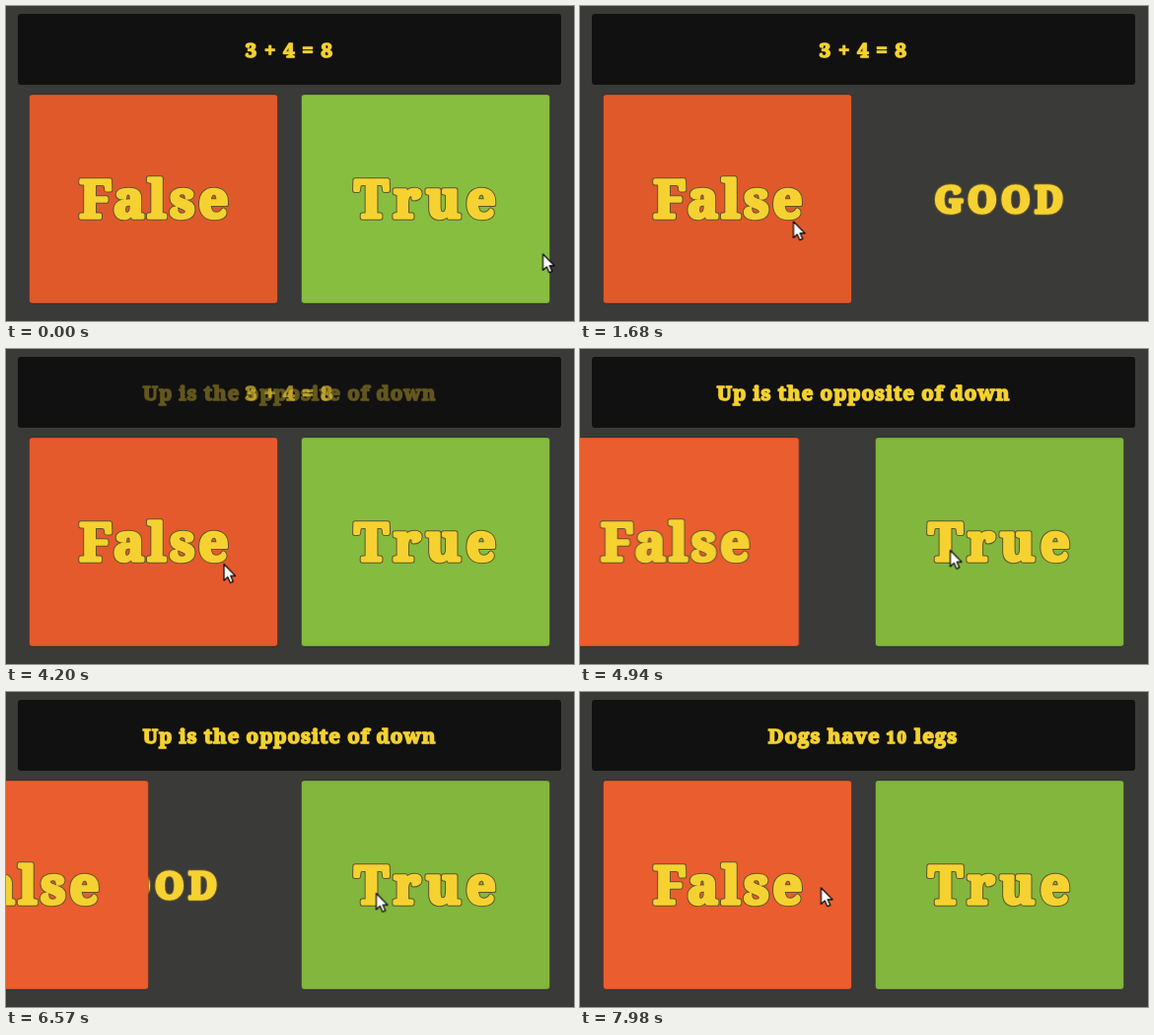
Recreate the animation shown at these times as an HTML page. Size 576 by 320 pixels, loop 8000 ms.

```html
<!DOCTYPE html>
<html lang="en">
<head>
<meta charset="utf-8">
<title>True or False</title>
<style>
html, body { margin: 0; width: 100%; height: 100%; overflow: hidden; background: #3a3a39; }
svg { display: block; width: 100%; height: 100%; }
text { font-family: "Noto Serif", serif; font-weight: 700; text-anchor: middle; }
.answer { font-size: 53px; letter-spacing: 3.4px; }
.wide { letter-spacing: 5.2px; }
.praise { font-size: 37.5px; letter-spacing: 4.6px; }
.question { font-size: 20.5px; letter-spacing: .95px; }
.sum { letter-spacing: 1.2px; }
.low { font-size: 16px; letter-spacing: 2px; }

/* Each label is a dark rim under a thickened yellow face. */
.rim, .face { stroke-linejoin: round; }
.rim { fill: #63552c; stroke: #63552c; stroke-width: 5.4px; }
.face { fill: #f5d231; stroke: #f5d231; stroke-width: 3.4px; }
.small .rim { stroke: #4d431b; stroke-width: 2.4px; }
.small .face { stroke-width: 1.4px; }
.card { stroke: #000; stroke-opacity: .25; }

.loop, .loop * { animation: 8s linear infinite; }
#true-card { animation-name: slide-right; }
#false-card { animation-name: slide-left; }
#orange { fill: #e0592b; animation-name: orange; }
#green { fill: #87be40; animation-name: green; }
#q1 { animation-name: first; }
#q2 { opacity: 0; animation-name: second; }
#q3 { opacity: 0; animation-name: third; }
#cursor { animation-name: point; animation-timing-function: ease-in-out; }

@keyframes slide-right {
  0%, 14.59% { transform: none; }
  20.09%, 33.625% { transform: translateX(277px); }
  39.125%, 100% { transform: none; }
}
@keyframes slide-left {
  0%, 60.7% { transform: none; }
  66.2%, 79.25% { transform: translateX(-276px); }
  84.75%, 100% { transform: none; }
}
@keyframes orange {
  0%, 50.25% { fill: #e0592b; }
  56.5%, 100% { fill: #ea5d2f; }
}
@keyframes green {
  0%, 50.25% { fill: #87be40; }
  56.5%, 100% { fill: #82b63c; }
}
@keyframes first {
  0%, 50.25% { opacity: 1; }
  56.5%, 100% { opacity: 0; }
}
@keyframes second {
  0%, 50.25% { opacity: 0; }
  56.5%, 93.25% { opacity: 1; }
  99.6%, 100% { opacity: 0; }
}
@keyframes third {
  0%, 93.25% { opacity: 0; }
  99.6%, 100% { opacity: 1; }
}
@keyframes point {
  0%, .375% { transform: translate(544.5px, 252px); }
  6.625%, 51.5% { transform: translate(216.5px, 219px); }
  59.875%, 93.25% { transform: translate(375.5px, 204.5px); }
  99.75%, 100% { transform: translate(244.5px, 199px); }
}
</style>
</head>
<body>
<svg viewBox="0 0 576 320" preserveAspectRatio="none">
  <defs>
    <text id="false-text" class="answer" x="151.7" y="215">False</text>
    <text id="true-text" class="answer wide" x="427.5" y="215">True</text>
    <text id="good-text" class="praise" x="427" y="210">GOOD</text>
    <text id="sum-text" class="question sum" x="287.5" y="52">3 + 4 = 8</text>
    <text id="up-text" class="question" x="287.5" y="51.5">Up is the opposite of down</text>
    <text id="dogs-text" class="question" x="287" y="51.5">Dogs have <tspan class="low">10</tspan> legs</text>
  </defs>

  <rect width="576" height="320" fill="#3a3a39"/>
  <rect x="12" y="8" width="551" height="72" rx="3" fill="#111"/>

  <g class="small">
    <g class="loop"><g id="q1"><use href="#sum-text" class="rim"/><use href="#sum-text" class="face"/></g></g>
    <g class="loop"><g id="q2"><use href="#up-text" class="rim"/><use href="#up-text" class="face"/></g></g>
    <g class="loop"><g id="q3"><use href="#dogs-text" class="rim"/><use href="#dogs-text" class="face"/></g></g>
  </g>

  <g id="praise">
    <use href="#good-text" class="rim"/><use href="#good-text" class="face"/>
    <use href="#good-text" class="rim" x="-276"/><use href="#good-text" class="face" x="-276"/>
  </g>

  <g class="loop">
    <g id="false-card">
      <rect id="orange" class="card" x="23.5" y="90" width="252" height="212" rx="3"/>
      <use href="#false-text" class="rim"/><use href="#false-text" class="face"/>
    </g>
    <g id="true-card">
      <rect id="green" class="card" x="299.5" y="90" width="252" height="212" rx="3"/>
      <use href="#true-text" class="rim"/><use href="#true-text" class="face"/>
    </g>
    <path id="cursor" d="M0 0V16.5L3.8 12.9L6.4 18.8L9.2 17.6L6.7 11.8H11.6Z" fill="#fff" stroke="#000" stroke-width="1.2" stroke-linejoin="round"/>
  </g>
</svg>
</body>
</html>
```
